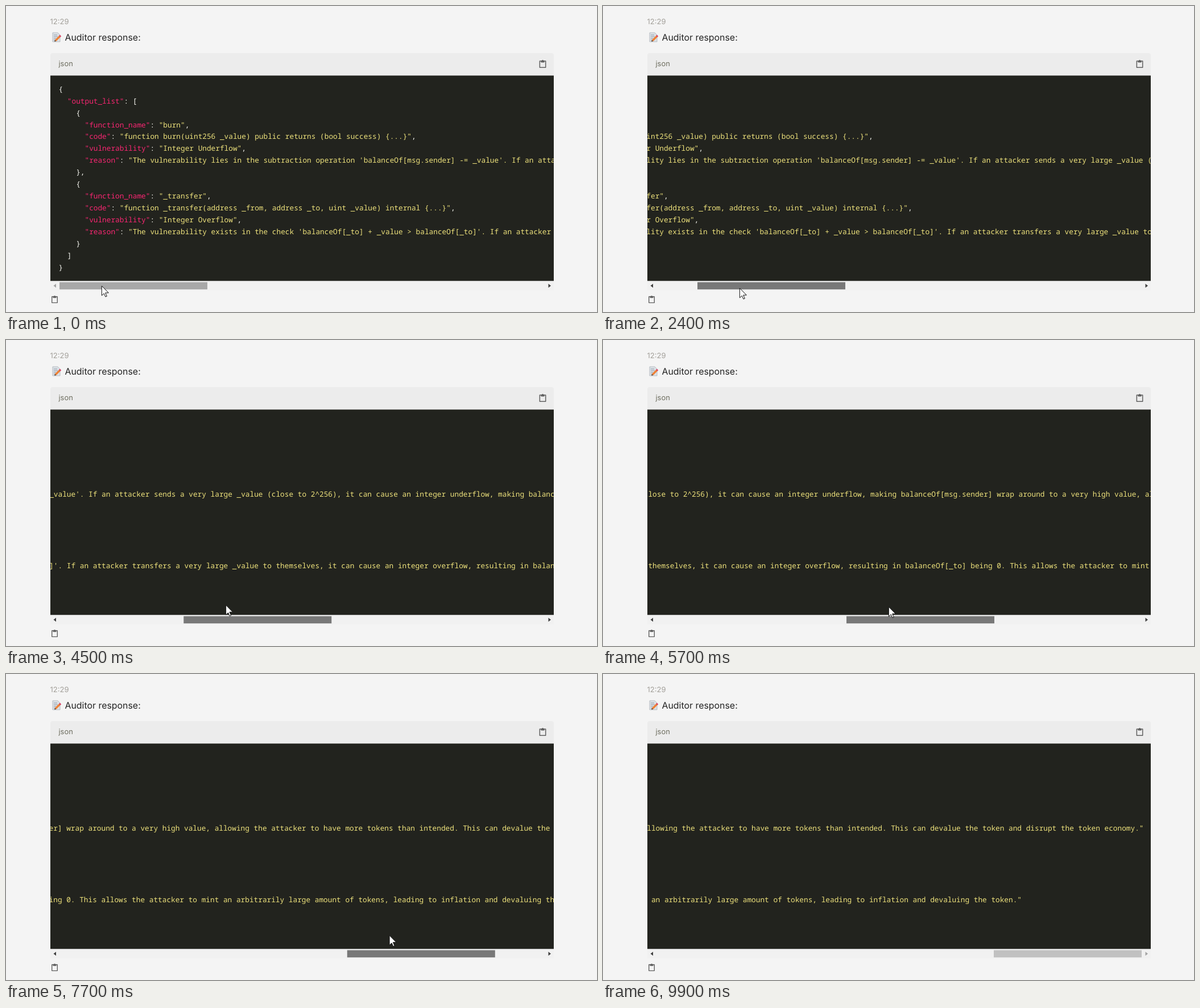
Recreate the animation shown at these times as an HTML page. Size 1039 by 539 pixels, loop 10000 ms.

```html
<!DOCTYPE html>
<html lang="en">
<head>
<meta charset="utf-8">
<title>Auditor response</title>
<style>
  html, body { margin: 0; width: 100%; height: 100%; overflow: hidden; background: #f4f4f4; }
  svg { display: block; }
  text { white-space: pre; text-rendering: geometricPrecision; font-family: Inter, sans-serif; }
  #code text { font: 500 12.775px "Noto Sans Mono", monospace; fill: #f8f8f2; }
  #code .key { fill: #f92672; }
  #code .string { fill: #eee27c; }
</style>
</head>
<body>
<svg width="1039" height="539" viewBox="0 0 1039 539">
  <defs>
    <g id="clipboard">
      <path d="M1.7 2.7H11.3V13.3H1.7Z" fill="none" stroke="#606060" stroke-width="1.4" stroke-linejoin="round"/>
      <path d="M3.7 2H5A1.6 1.6 0 0 1 8 2H9.3V5H3.7Z" fill="#606060"/>
    </g>
  </defs>

  <text x="77.5" y="31.8" font-size="13" fill="#a3a09a">12:29</text>
  <g id="memo">
    <path d="M82 47H91L95 51V63H82Z" fill="#dce1e6" stroke="#a9b0b8" stroke-width=".8"/>
    <path d="M84 51H90M84 54H91M84 57H88M84 60H87" stroke="#8c99a8"/>
    <path d="M87 61L95 53" stroke="#ee8136" stroke-width="3.4"/>
    <path d="M94.3 53.7L96 52" stroke="#d9476a" stroke-width="3.4"/>
    <path d="M85 63L86 59.8L88.2 62Z" fill="#5b4636"/>
  </g>
  <text x="103.5" y="60.5" font-size="15.9" fill="#242424">Auditor response:</text>

  <path d="M78 122V87Q78 83 82 83H959Q963 83 963 87V122Z" fill="#ececec"/>
  <text x="92.5" y="106.3" font-size="12.9" fill="#6d6d5f">json</text>
  <use href="#clipboard" transform="translate(936.5 94) scale(1.08)"/>
  <use href="#clipboard" x="79" y="509.3"/>

  <rect x="78" y="122.5" width="885" height="362" fill="#22231e"/>
  <svg x="78" y="122" width="885" height="362" overflow="hidden"><g id="code"></g></svg>

  <rect x="78" y="484.5" width="885" height="16.5" fill="#f1f1f1"/>
  <path id="left" d="M88 489.2V496.2L83.5 492.7Z"/>
  <path id="right" d="M953.5 489.2V496.2L958 492.7Z"/>
  <rect id="thumb" y="486.5" width="260" height="12.7"/>
  <path id="cursor" d="M0 0V17L4 13.4L6.6 19.2L9 18.2L6.4 12.2H12Z" fill="#fff" stroke="#111"/>
</svg>

<script>
const LOOP = 10000, STEP = 100;
const THUMB_MIN = 94, THUMB_MAX = 687, SCROLL_RATIO = 3.41, GRIP = 74.3;
const DRAG_START = 700, RELEASE = 9200, CURSOR_GONE = 9500;

const source = `{
  "output_list": [
    {
      "function_name": "burn",
      "code": "function burn(uint256 _value) public returns (bool success) {...}",
      "vulnerability": "Integer Underflow",
      "reason": "The vulnerability lies in the subtraction operation 'balanceOf[msg.sender] -= _value'. If an attacker sends a very large _value (close to 2^256), it can cause an integer underflow, making balanceOf[msg.sender] wrap around to a very high value, allowing the attacker to have more tokens than intended. This can devalue the token and disrupt the token economy."
    },
    {
      "function_name": "_transfer",
      "code": "function _transfer(address _from, address _to, uint _value) internal {...}",
      "vulnerability": "Integer Overflow",
      "reason": "The vulnerability exists in the check 'balanceOf[_to] + _value > balanceOf[_to]'. If an attacker transfers a very large _value to themselves, it can cause an integer overflow, resulting in balanceOf[_to] being 0. This allows the attacker to mint an arbitrarily large amount of tokens, leading to inflation and devaluing the token."
    }
  ]
}`;

// [time, position] pairs
const thumbPath = [[0, 94], [800, 94], [2400, 166], [4500, 312.3], [5700, 428], [7000, 528.6], [8400, 671], [8700, THUMB_MAX]];
const cursorPath = [[0, 493], [800, 493], [2400, 497], [4500, 467], [5700, 470], [7000, 457], [8400, 464], [9500, 480]];

const byId = id => document.getElementById(id);
const [code, thumb, cursor, left, right] = ["code", "thumb", "cursor", "left", "right"].map(byId);

function highlight(line) {
  const escaped = line.replace(/>/g, "&gt;");
  return escaped.replace(/"[^"]*"(:?)/g, (token, colon) =>
    `<tspan class="${colon ? "key" : "string"}">${colon ? token.slice(0, -1) : token}</tspan>${colon}`);
}

code.innerHTML = source.split("\n").map((line, i) =>
  `<text x="14.5" y="${28.8 + i * 20.92}">${highlight(line)}</text>`).join("");

function sample(path, time) {
  const next = path.findIndex(([t]) => t > time);
  if (next < 0) return path[path.length - 1][1];
  const [t0, v0] = path[next - 1], [t1, v1] = path[next];
  return v0 + (v1 - v0) * (time - t0) / (t1 - t0);
}

function draw(now) {
  const time = Math.floor(now % LOOP / STEP) * STEP;
  const x = sample(thumbPath, time);
  const dragging = time >= DRAG_START && time < RELEASE;
  const arrowColor = disabled => disabled ? "#a3a3a3" : "#404040";

  code.setAttribute("transform", `translate(${-Math.round((x - THUMB_MIN) * SCROLL_RATIO)} 0)`);
  thumb.setAttribute("x", x);
  thumb.setAttribute("fill", dragging ? "#787878" : time < DRAG_START ? "#a8a8a8" : "#c1c1c1");
  left.setAttribute("fill", arrowColor(x <= THUMB_MIN));
  right.setAttribute("fill", arrowColor(x >= THUMB_MAX));
  cursor.setAttribute("transform", `translate(${x + GRIP} ${sample(cursorPath, time)})`);
  cursor.setAttribute("visibility", time < CURSOR_GONE ? "visible" : "hidden");
}

const start = performance.now();
function frame() {
  draw(performance.now() - start);
  requestAnimationFrame(frame);
}
frame();
</script>
</body>
</html>
```
